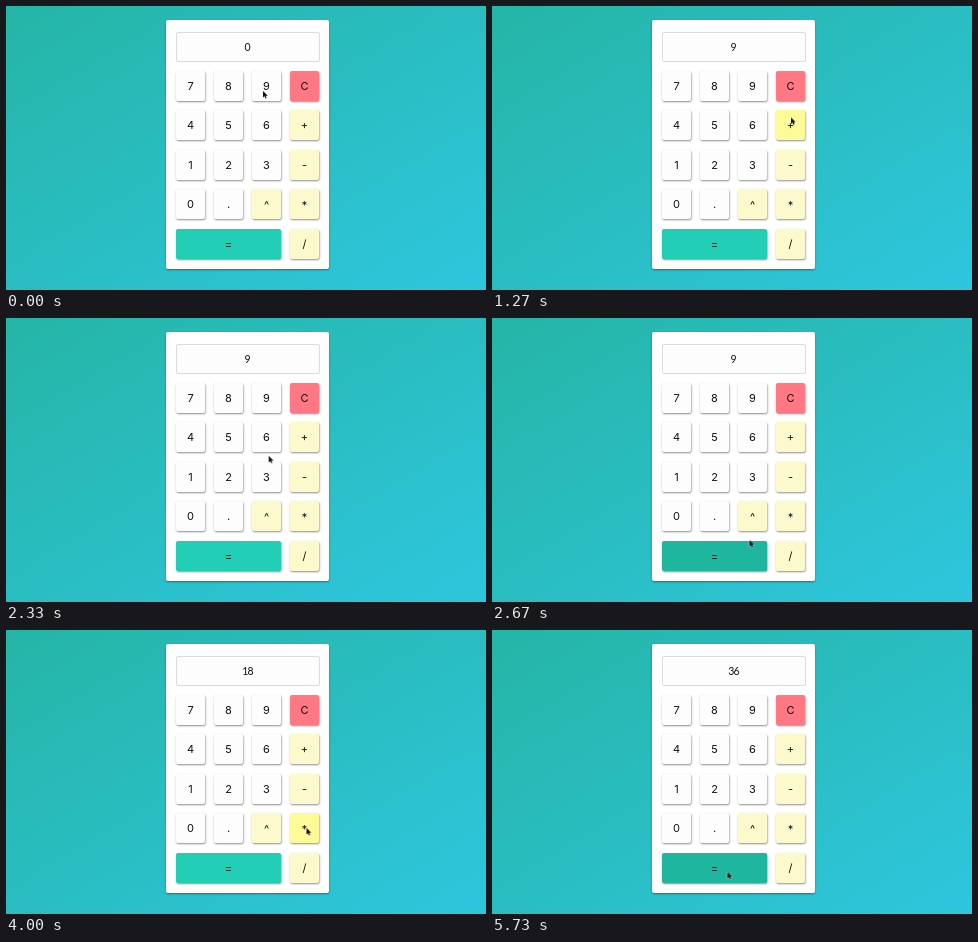
These frames come from a looping animation (480x284 px, 5790 ms). An HTML page:

```html
<!DOCTYPE html>
<html lang="en">
<head>
<meta charset="utf-8">
<title>Calculator</title>
<style>
html, body { margin: 0; width: 100%; height: 100%; overflow: hidden; }
body {
  position: relative;
  background: linear-gradient(to bottom right, #25b5a6, #2ec6de);
  font: 11px/30px Inter, Roboto, sans-serif;
  color: #111;
  --loop: 5790ms;
}
.panel {
  position: absolute; left: 160px; top: 14px; width: 163px; height: 249px;
  background: #fff; border-radius: 2px;
  box-shadow: 0 1px 2px rgba(0, 0, 0, .4);
}
.display {
  position: absolute; left: 9.5px; top: 11.5px; width: 142px; height: 28px;
  border: 1px solid #dcdcde; border-radius: 2px; background: #fdfdfe;
  overflow: hidden; text-align: center;
  font: 10.5px/28px Lato, Inter, sans-serif;
}
.strip { animation: show var(--loop) step-end infinite; }
.strip div { height: 28px; }
.tight { letter-spacing: -.8px; }
.keys {
  position: absolute; left: 9.75px; top: 51px;
  display: grid; grid-template-columns: repeat(4, 29.5px); grid-auto-rows: 30px;
  gap: 9.4px 8.5px; text-align: center;
}
.keys span {
  --face: #fefdfe; --over: #f2f0f2;
  background: var(--face); border-radius: 2px;
  box-shadow: .5px 1px 2px rgba(0, 0, 0, .45);
}
.keys .op { --face: #fcfacc; --over: #fdfb98; }
.keys .clear { --face: #ff7884; }
.keys .equals { --face: #22ceb5; --over: #1fb69f; grid-column: span 3; }
.keys .low { line-height: 33px; }

.nine, .plus, .equals, .times, .two {
  animation: var(--hover) var(--loop) step-end infinite, var(--press) var(--loop) step-end infinite;
}
.nine { --hover: hover-nine; --press: press-nine; }
.plus { --hover: hover-plus; --press: press-plus; }
.equals { --hover: hover-equals; --press: press-equals; }
.times { --hover: hover-times; --press: press-times; }
.two { --hover: hover-two; --press: press-two; }

.cursor {
  position: absolute; left: 0; top: 0; width: 7px; height: 10px; overflow: visible;
  animation: move var(--loop) ease-in-out infinite;
}

@keyframes show {
  0% { transform: none; }
  11.48% { transform: translateY(-28px); }
  58.7% { transform: translateY(-56px); }
  82.8% { transform: translateY(-84px); }
  94.4%, 100% { transform: translateY(-112px); }
}
@keyframes hover-nine {
  0%, 18.2%, 37.8%, 100% { background: var(--face); }
  9.13%, 30.3% { background: var(--over); }
}
@keyframes hover-plus {
  0%, 27.8%, 100% { background: var(--face); }
  19.3% { background: var(--over); }
}
@keyframes hover-equals {
  0%, 64.7%, 100% { background: var(--face); }
  45.9%, 86.7% { background: var(--over); }
}
@keyframes hover-times {
  0%, 74.5%, 100% { background: var(--face); }
  66.6% { background: var(--over); }
}
@keyframes hover-two {
  0%, 84.3%, 100% { background: var(--face); }
  77.2% { background: var(--over); }
}
@keyframes press-nine {
  9.13%, 34.5% { box-shadow: 0 0 1px rgba(0, 0, 0, .45); }
  0%, 11.48%, 35.7%, 100% { box-shadow: .5px 1px 2px rgba(0, 0, 0, .45); }
}
@keyframes press-plus {
  24.1% { box-shadow: 0 0 1px rgba(0, 0, 0, .45); }
  0%, 25.3%, 100% { box-shadow: .5px 1px 2px rgba(0, 0, 0, .45); }
}
@keyframes press-equals {
  56.4%, 92% { box-shadow: 0 0 1px rgba(0, 0, 0, .45); }
  0%, 58.7%, 94.4%, 100% { box-shadow: .5px 1px 2px rgba(0, 0, 0, .45); }
}
@keyframes press-times {
  71.3% { box-shadow: 0 0 1px rgba(0, 0, 0, .45); }
  0%, 72.5%, 100% { box-shadow: .5px 1px 2px rgba(0, 0, 0, .45); }
}
@keyframes press-two {
  80.6% { box-shadow: 0 0 1px rgba(0, 0, 0, .45); }
  0%, 82.8%, 100% { box-shadow: .5px 1px 2px rgba(0, 0, 0, .45); }
}
@keyframes move {
  0%, 1.2% { transform: translate(257px, 85px); }
  5.7%, 15% { transform: translate(258.5px, 77px); }
  21.9%, 25.4% { transform: translate(299px, 111.5px); }
  29.88% { transform: translate(273px, 96px); }
  32.3%, 35.75% { transform: translate(266px, 84px); }
  46.1% { transform: translate(257.5px, 222px); }
  51.8%, 62.2% { transform: translate(252px, 236px); }
  69%, 72.5% { transform: translate(300.5px, 198px); }
  79.5%, 82.9% { transform: translate(228px, 161px); }
  88.6%, 100% { transform: translate(235.5px, 242px); }
}
</style>
</head>
<body>
<div class="panel">
  <div class="display">
    <div class="strip">
      <div>0</div><div>9</div><div class="tight">18</div><div>2</div><div class="tight">36</div>
    </div>
  </div>
  <div class="keys">
    <span>7</span><span>8</span><span class="nine">9</span><span class="clear">C</span>
    <span>4</span><span>5</span><span>6</span><span class="op plus">+</span>
    <span>1</span><span class="two">2</span><span>3</span><span class="op">-</span>
    <span>0</span><span>.</span><span class="op low">^</span><span class="op times low">*</span>
    <span class="equals">=</span><span class="op">/</span>
  </div>
</div>
<svg class="cursor" viewBox="0 0 7 10">
  <path d="M0 0V6.6L1.6 5.2L2.6 7.6L3.7 7.1L2.7 4.8H4.8Z" fill="#111" stroke="#fff" stroke-width=".6" paint-order="stroke"/>
</svg>
</body>
</html>
```
